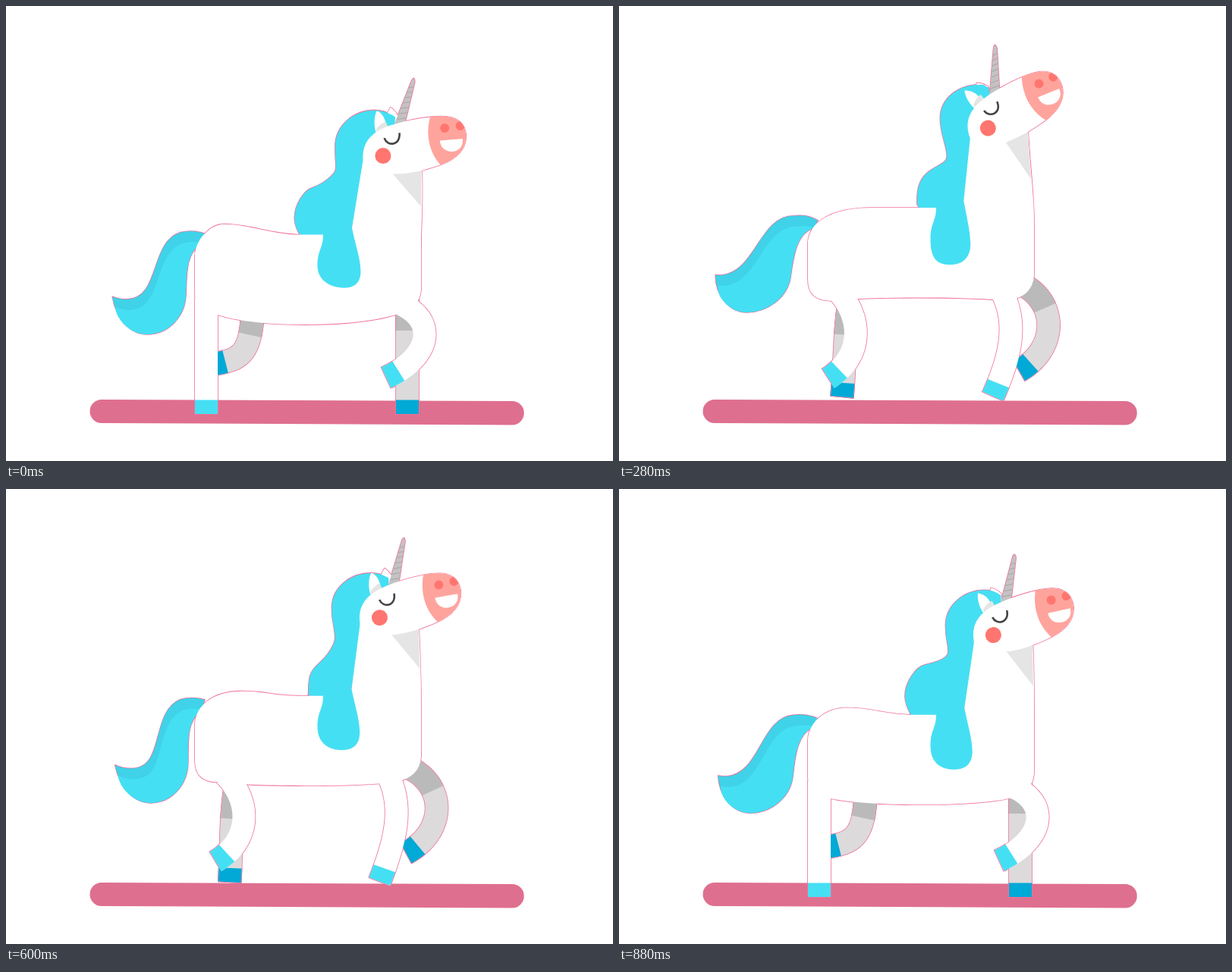
An HTML page that plays this animation: 800 by 600 pixels, repeating every 0.96 s.

```html
<!DOCTYPE html>
<html lang="en">
<head>
<meta charset="utf-8">
<title>Prancing unicorn</title>
<style>
  html, body { margin: 0; width: 100%; height: 100%; overflow: hidden; background: #fff; }
  svg { display: block; width: 100vw; height: 100vh; }
</style>
</head>
<body>
<svg viewBox="0 0 800 600">
  <defs>
    <clipPath id="muzzleClip"><use href="#muzzle"/></clipPath>
    <clipPath id="hornClip"><use href="#horn"/></clipPath>
    <path id="muzzle" d="M559 146.8C568 146 578 146.3 585 147.5C600 151 606 160 606 174C605 192 592 203 572 210.5C556 192 553 168 559 146.8Z"/>
    <path id="horn" d="M537.5 96Q535.5 97 534 101L511 158L526 154L539 101Q538.8 96 537.5 96Z"/>
    <g id="pony">
      <g id="farHind"></g>
      <g id="farFront"></g>
      <path id="tail" fill="#3fd2e8"/>
      <path id="tailLight" fill="#45dff3" stroke="none"/>
      <g class="head"><path class="backEar" fill="#fff" d="M500 150Q503 140 507 134Q513 138 517 146L512 160Z"/></g>
      <path id="mane" fill="#45dff3"/>
      <path id="body" fill="#fff"/>
      <path id="chin" fill="#e5e5e5" stroke="none"/>
      <path id="lock" fill="#45dff3"/>
      <g id="nearHind"></g>
      <g id="nearFront"></g>
      <g class="head">
        <use href="#horn" fill="#c4c2c2"/>
        <g clip-path="url(#hornClip)" stroke="#adabab" stroke-width="1.3"><path d="M525 109l16-2M522 115.5l18-2M519 122l20-2M515 129l22-2M512 136l24-2M509 143l26-2M508 150l26-2"/></g>
        <path class="ear" fill="#fff" d="M489 138C498 143 501 152 501 162L488 169C484 158 485 146 489 138Z"/>
        <path fill="#e5e5e5" stroke="none" d="M488 170L487.5 163C491 158 495 155 500.5 153L504 162Z"/>
        <path fill="#fff" d="M470 204C468 172 492 161 520 154C545 148 570 145 585 147.5C600 151 606 160 606 174C605 192 592 203 572 210.5C550 218 528 223 508 222Z"/>
        <g stroke="none">
          <use href="#muzzle" fill="#ffa49d"/>
          <g fill="#ff756f">
            <circle cx="496.5" cy="198" r="10.5"/>
            <circle cx="578" cy="162" r="6"/>
            <circle cx="598.5" cy="159" r="6" clip-path="url(#muzzleClip)"/>
          </g>
          <path fill="#fff" d="M571.5 178.5L601.5 176C603 186 596 193 587 193C578 193 572 187 571.5 178.5Z"/>
        </g>
        <path fill="none" stroke="#444" stroke-width="2.6" d="M498.3 174.5C502 186 520 185 518.3 168"/>
      </g>
    </g>
  </defs>
  <path fill="#df6f8f" d="M126 519L667 521A15.7 15.7 0 0 1 667 552.5L126 550A15.5 15.5 0 0 1 126 519Z"/>
  <g stroke="#f0709a" stroke-width="1.6" stroke-linejoin="round"><use href="#pony"/></g>
  <use href="#pony"/>
</svg>
<script>
const $ = id => document.getElementById(id);
const all = q => document.querySelectorAll(q);
const draw = (id, d) => $(id).setAttribute('d', d);
const mix = (a, b, u) => a.map((v, i) => v + (b[i] - v) * u);
const clamp = u => Math.max(0, Math.min(1, u));

// Two hops per loop; the picture changes in steps.
const LOOP = 960, HOP = 480, STEP = 40, LAST = 880;
const TAKEOFF = 72, FLIGHT = 264;
const wave = (t, peak) => Math.cos((t - peak) / HOP * 2 * Math.PI);

// Centre lines of each leg as cubics, in the two planted stances.
const legs = {
  farHind: { dark: 40, lift: 13, bow: 5,
    a: [325, 394, 325, 468, 302, 466, 271, 473],
    b: [297, 404, 289, 440, 293, 485, 300, 537] },
  farFront: { dark: 46, lift: 13, bow: 0,
    a: [529, 382, 529, 438, 529, 488, 529, 538],
    b: [530, 372, 592, 388, 592, 452, 527, 476] },
  nearHind: { lift: 20, bow: 6,
    a: [264, 385, 264, 440, 264, 490, 264, 538],
    b: [294, 388, 334, 415, 336, 468, 279, 494] },
  nearFront: { lift: 20, bow: 16,
    a: [522, 394, 568, 416, 560, 463, 501, 490],
    b: [500, 388, 514, 435, 493, 475, 490.5, 537] }
};
for (const [id, leg] of Object.entries(legs)) {
  const fills = leg.dark ? ['#dcdadb', '#00a9d6', '#bababa'] : ['#fff', '#45dff3'];
  leg.parts = fills.map(fill => {
    const p = document.createElementNS('http://www.w3.org/2000/svg', 'path');
    p.setAttribute('fill', fill);
    return $(id).appendChild(p);
  });
}

// Points down both sides of a band around a cubic, with the length so far.
function band(p, half = 15, n = 48) {
  const out = [];
  let len = 0, last;
  for (let i = 0; i <= n; i++) {
    const u = i / n, w = 1 - u;
    const pos = k => w * w * w * p[k] + 3 * w * w * u * p[k + 2] + 3 * w * u * u * p[k + 4] + u * u * u * p[k + 6];
    const vel = k => w * w * (p[k + 2] - p[k]) + 2 * w * u * (p[k + 4] - p[k + 2]) + u * u * (p[k + 6] - p[k + 4]);
    const x = pos(0), y = pos(1), dx = vel(0), dy = vel(1), r = half / Math.hypot(dx, dy);
    if (last) len += Math.hypot(x - last[0], y - last[1]);
    last = [x, y];
    out.push([len, x - dy * r, y + dx * r, x + dy * r, y - dx * r]);
  }
  return out;
}

function cut(rows, from, to) {
  const at = s => {
    let i = 0;
    while (i < rows.length - 2 && rows[i + 1][0] < s) i++;
    const a = rows[i], b = rows[i + 1];
    return mix(a, b, (s - a[0]) / (b[0] - a[0]));
  };
  const part = [at(from), ...rows.filter(r => r[0] > from && r[0] < to), at(to)];
  const left = part.map(r => [r[1], r[2]]), right = part.map(r => [r[3], r[4]]).reverse();
  return 'M' + left.concat(right).map(q => q.map(v => v.toFixed(2))).join('L') + 'Z';
}

function drawLeg(leg, t) {
  const u = clamp((t % HOP - TAKEOFF) / FLIGHT), air = Math.sin(Math.PI * u);
  const pose = mix(leg.a, leg.b, t < HOP ? u : 1 - u)
    .map((v, i) => i % 2 ? v - leg.lift * air : v);
  pose[4] += leg.bow * air;
  const rows = band(pose), len = rows[rows.length - 1][0];
  const spans = [[0, len], [len - 18.5, len], [0, leg.dark]];
  leg.parts.forEach((p, i) => p.setAttribute('d', cut(rows, ...spans[i])));
}

function drawTail(top, w) {
  const shape = (dx, dy) => {
    // A point of the hanging tail and how far a full swing moves it.
    const p = (x, y, kx = 0, ky = 0) => `${x - kx * w} ${y - ky * w + top} `;
    const q = (x, y, kx, ky) => p(x + dx, y + dy, kx, ky);
    return `M${q(262, 2, 0, -4)}C${q(250, -1)}${q(240, -1)}${q(230, 2, 0, 2)}
      C${q(190, 20, 5, 20)}${q(213, 94, 33, 20)}${q(168, 94, 33, 16)}
      Q${q(155, 94, 24, 16)}${q(145, 89, 18, 11)}
      C${p(152, 120, 25, 15)}${p(170, 139, 25, 12)}${p(193, 139, 25, 12)}
      C${p(220, 139, 25, 12)}${p(241, 115, 19, 7)}${p(241, 85, 15, 5)}
      C${p(241, 55, 11, 5)}${p(238, 33, 3, 11)}${p(257, 16)}Z`;
  };
  draw('tail', shape(0, 0));
  draw('tailLight', shape(4, 14));
}

function drawBody(t) {
  const y = 280.5 + 22.5 * wave(t, -27);
  const stretch = wave(t, 245), sway = wave(t, 180);
  const cx = 491 + 5.5 * wave(t, 13), cy = 176.3 + 22.3 * wave(t, -23);
  const turn = 8.8 * wave(t, 30) - 8.5, ear = 12 * wave(t, 80) - 6.5;
  const rad = turn * Math.PI / 180, cos = Math.cos(rad), sin = Math.sin(rad);
  const onHead = (x, v) => `${cx + x * cos - v * sin} ${cy + x * sin + v * cos}`;

  drawTail(y + 3.5 + 8 * stretch, 0.53 + 0.53 * wave(t, 320));

  const neck = cx + 51 - 0.12 * turn, nape = 456 + 0.1 * turn;
  const rump = y + 38 + 10 * stretch, top = y + Math.min(0, 8.5 * stretch - 5.5);
  const humpX = 312 + 25 * stretch;
  const drop = 114.5 + 9 * stretch, e = y + drop, sag = y + (474 - drop) / 3;
  draw('body', `M249 ${rump}C249 ${rump - 22} 270 ${top} ${humpX} ${top}
    C${humpX + 35} ${top} 350 ${y} 390 ${y}L418 ${y}L${nape} ${y - 9}L${onHead(-26, 6)}
    L${neck} ${cy}C${neck + 3} ${cy + 55} 547 ${y - 20} 547 ${y + 20}L547 ${e - 33}
    Q545 ${e - 6} 513 ${e}C460 ${sag} 330 ${sag} 279 ${e}Q249 ${e} 249 ${e - 28}Z`);

  draw('chin', `M${cx + 13 - 0.65 * turn} ${cy + 24 + 0.3 * turn}L${neck} ${cy + 5}
    L${(neck + 547) / 2} ${cy + 67}Z`);

  const low = y + 70 - 0.3 * turn, lowX = 446 + 0.55 * turn, right = 467.5 + 0.25 * turn;
  draw('lock', `M418 ${y}C418 ${y + 18} 410.5 ${y + 20} 410.5 ${y + 41}
    C410.5 ${low - 11} ${lowX - 20} ${low} ${lowX} ${low}
    C${lowX + 16} ${low} ${right + 0.5} ${low - 9} ${right} ${y + 47}
    C${right - 0.5} ${y + 30} ${nape + 4} ${y + 12} ${nape} ${y - 9}L440 ${y - 16}L418 ${y - 3}Z`);

  // Mane: crown, back of the neck, pinch, then the lobe over the back.
  const crown = cy - 58.7 + 1.5 * stretch, back = cx - 62.5;
  const px = 433.5 + (cx - 491) / 4, py = cy + 27 + 11 * stretch;
  const mx = 408.5 + 5.5 * sway, my = y - 52.5 + 14 * sway, slope = 0.6 + 0.4 * sway;
  const lx = 389.5 + 13 * sway, ly = y - 14 + 11 * sway, foot = lx + 4 - 4 * sway;
  draw('mane', `M${onHead(17, -51)}C${onHead(10, -56)} ${cx} ${crown} ${cx - 11} ${crown}
    C${cx - 39} ${crown} ${back} ${cy - 39} ${back} ${cy - 13}
    C${back} ${cy + 8} ${px} ${py - 14} ${px} ${py}
    C${px} ${py + 9} ${mx + 12} ${my - 12 * slope} ${mx} ${my}
    C${mx - 12} ${my + 12 * slope} ${lx} ${ly - 18} ${lx} ${ly}
    C${lx} ${ly + 10} ${foot - 3} ${y - 6} ${foot} ${y}L${foot + 4} ${y + 6}
    L450 ${y + 6}L${onHead(-10, 6)}L${onHead(16, -38)}Z`);

  const place = (q, how) => all(q).forEach(g => g.setAttribute('transform', how));
  place('.head', `translate(${cx} ${cy}) rotate(${turn}) translate(-496 -198)`);
  place('.ear', `rotate(${ear} 497 165)`);
  place('.backEar', `rotate(${ear} 512 160)`);
}

function render(ms) {
  const t = Math.min(Math.floor(ms % LOOP / STEP) * STEP, LAST);
  drawBody(t);
  for (const id in legs) drawLeg(legs[id], t);
}

let start;
function tick(now) {
  start ??= now;
  render(now - start);
  requestAnimationFrame(tick);
}
render(0);
requestAnimationFrame(tick);
</script>
</body>
</html>
```
